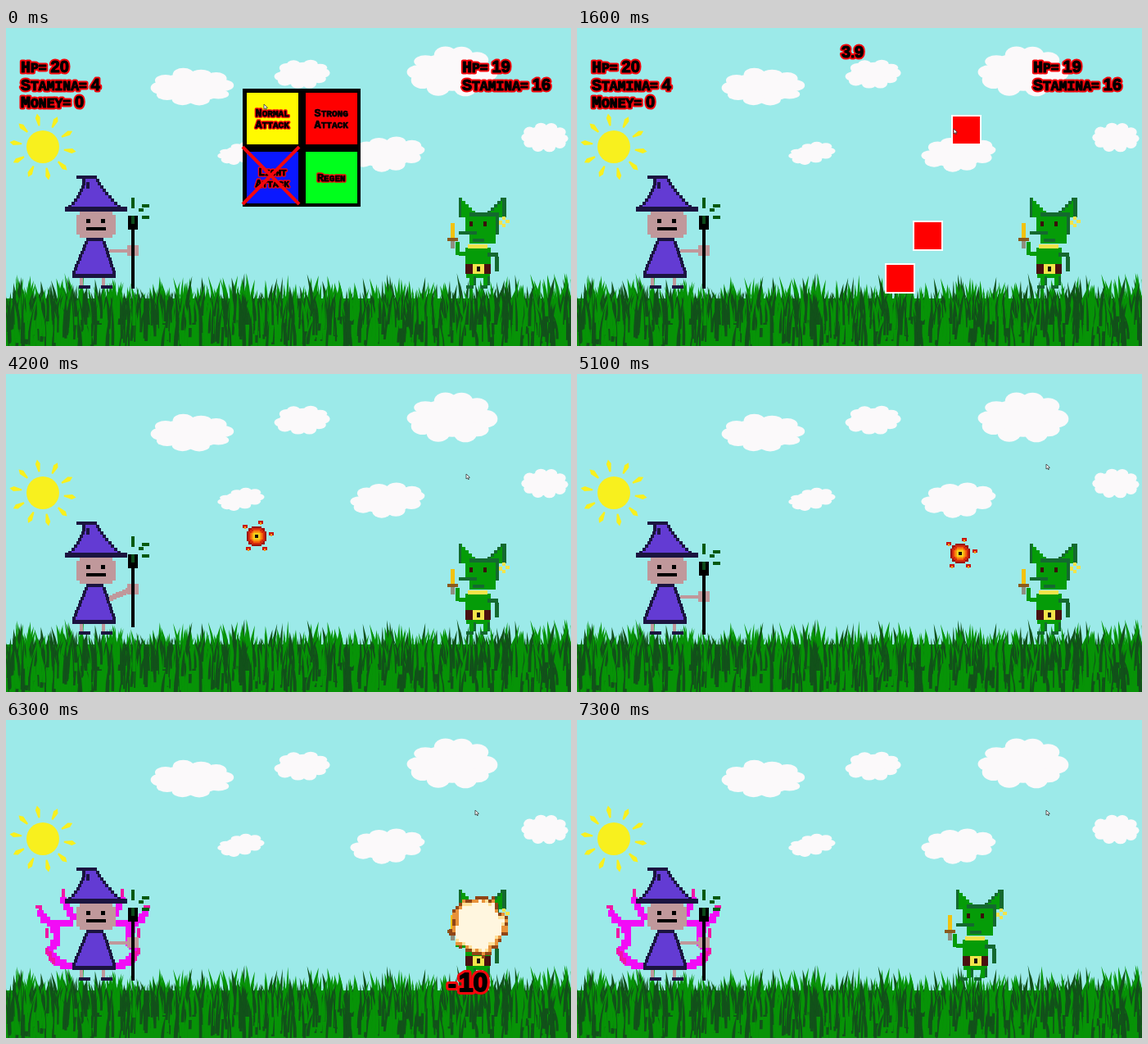
Animation, 690 px wide and 388 px high, one loop 7400 ms. Source, as an HTML page with a canvas:

```html
<!DOCTYPE html>
<html lang="en">
<head>
<meta charset="utf-8">
<title>Turn battle</title>
<style>
html, body { margin: 0; width: 100%; height: 100%; overflow: hidden; background: #9ceae9; }
canvas { display: block; width: 690px; height: 388px; }
</style>
</head>
<body>
<canvas id="stage" width="690" height="388"></canvas>
<script>
const W = 690, H = 388, STEP = 100, STEPS = 74;
const stage = document.getElementById('stage').getContext('2d');
const back = document.createElement('canvas');
back.width = W;
back.height = H;
let g = stage;

let seed = 11;
const rnd = (a = 0, b = 1) => {
  seed = (seed * 16807) % 2147483647;
  return a + (b - a) * seed / 2147483647;
};
const mix = (a, b, k) => a + (b - a) * k;

function rect(color, x, y, w, h) {
  g.fillStyle = color;
  g.fillRect(x, y, w, h);
}

function disc(x, y, rx, ry = rx, turn = 0) {
  g.beginPath();
  g.ellipse(x, y, rx, ry, turn, 0, 7);
  g.fill();
}

// ---- scenery ----
function cloud(l, t, r, b, tilt = 0) {
  const x = (l + r) / 2, y = (t + b) / 2, w = (r - l) / 2, h = (b - t) / 2, lobes = 10;
  g.fillStyle = '#fbf9fa';
  disc(x, y, w * 0.82, h * 0.74, tilt);
  for (let i = 0; i < lobes; i++) {
    const a = (i + rnd(-0.2, 0.2)) * Math.PI * 2 / lobes, size = rnd(0.24, 0.36);
    const px = Math.cos(a) * w * 0.74;
    disc(x + px, y + Math.sin(a) * h * 0.66 + px * tilt, w * 0.25, h * size);
  }
}

function sun() {
  g.fillStyle = '#f8f01e';
  disc(45, 145, 20);
  for (let i = 0; i < 10; i++) {
    g.save();
    g.translate(45, 145);
    g.rotate((-100 + i * 36) * Math.PI / 180);
    g.beginPath();
    g.moveTo(26, -1);
    g.lineTo(36, -3);
    g.lineTo(41, 0);
    g.lineTo(36, 3);
    g.lineTo(26, 1);
    g.fill();
    g.restore();
  }
}

function blade(x, base, tip, lean, w, color) {
  const mid = (base + tip) / 2;
  g.beginPath();
  g.moveTo(x - w / 2, base);
  g.quadraticCurveTo(x - w / 2, mid, x + lean, tip);
  g.quadraticCurveTo(x + w / 2 + 1, mid, x + w / 2, base);
  g.fillStyle = color;
  g.fill();
}

function grass() {
  const light = '#079307', dark = '#12511a';
  rect(light, 0, 330, W, H - 330);
  for (let i = 0; i < 600; i++) {
    const tip = 331 - 32 * rnd() ** 2.2;
    blade(rnd(-5, W + 5), 362, tip, rnd(-9, 9), rnd(4, 8), rnd() < 0.36 ? dark : light);
  }
  for (let i = 0; i < 420; i++) {
    const base = rnd(350, 396);
    blade(rnd(-5, W + 5), base, Math.max(322, base - rnd(28, 60)), rnd(-8, 8), rnd(1.5, 4), dark);
    if (i % 2) blade(rnd(-5, W + 5), base, base - 42, rnd(-8, 8), 4, light);
  }
}

function scenery() {
  g = back.getContext('2d');
  rect('#9ceae9', 0, 0, W, H);
  sun();
  cloud(176, 48, 279, 96);
  cloud(327, 37, 396, 75, -0.06);
  cloud(489, 22, 601, 85);
  cloud(258, 139, 316, 166, -0.16);
  cloud(420, 131, 512, 175, -0.08);
  cloud(629, 114, 687, 153);
  grass();
  g = stage;
}

// ---- lettering: large capitals and digits, the rest as small capitals ----
function label(text, x, y, size, edge = 5) {
  g.lineJoin = 'round';
  for (const color of ['#f4060c', '#000']) {
    let at = x;
    for (const ch of text) {
      const digit = /\d/.test(ch), narrow = ch === ' ' || ch === '.';
      const family = digit ? '"Liberation Sans", sans-serif' : '"Liberation Mono", monospace';
      g.font = `bold ${digit || /[A-Z]/.test(ch) ? size : size * 0.82}px ${family}`;
      const up = ch.toUpperCase(), w = g.measureText(up).width;
      const px = narrow ? at - w / 4 : at;
      g.strokeStyle = g.fillStyle = color;
      g.lineWidth = color === '#000' ? size / 18 : edge;
      g.strokeText(up, px, y);
      g.fillText(up, px, y);
      at += narrow ? w / 2 : w;
    }
  }
}

function hud() {
  ['Hp= 20', 'Stamina= 4', 'Money= 0'].forEach((s, i) => label(s, 18, 54 + i * 21.5, 20));
  ['Hp= 19', 'Stamina= 16'].forEach((s, i) => label(s, 557, 54 + i * 21.5, 20));
}

const buttons = [
  ['#fffa00', 'Normal', 'Attack'], ['#ff0000', 'Strong', 'Attack'],
  ['#0a18ff', 'Light', 'Attack'], ['#00ff1c', 'Regen']
];

function menu() {
  rect('#000', 289, 74, 144, 144);
  buttons.forEach(([color, ...lines], i) => {
    const x = 294 + i % 2 * 72, y = 79 + (i >> 1) * 72;
    rect(color, x, y, 63, 63);
    lines.forEach((s, j) => label(s, x + 31 - s.length * 3.4, y + 43 - lines.length * 7 + j * 13.5, 13.5, 3.4));
  });
  g.strokeStyle = '#f4060c';
  g.lineWidth = 4;
  g.beginPath();
  g.moveTo(289, 145);
  g.lineTo(358, 215);
  g.moveTo(358, 145);
  g.lineTo(289, 215);
  g.stroke();
}

// ---- characters ----
// Rows of a shape with dark sides; left and right follow k from 0 to 1.
function rimmed(top, rows, left, right, rim, fill) {
  for (let i = 0; i < rows; i++) {
    const k = i / (rows - 1), y = top + i * 4;
    const l = Math.round(left(k)), r = Math.round(right(k));
    rect(rim, l, y, r - l, 4);
    rect(fill, l + 4, y, r - l - 8, 4);
  }
}

// Square blocks on a 4 px grid along a line of points.
function trace(color, size, ...points) {
  const snap = v => Math.round(v / 4) * 4;
  for (let i = 1; i < points.length; i++)
    for (let k = 0; k <= 1; k += 0.1) {
      const [x, y] = [0, 1].map(a => snap(mix(points[i - 1][a], points[i][a], k)));
      rect(color, x - size / 2, y - size / 2, size, size);
    }
}

function wings() {
  for (const side of [-1, 1]) {
    g.save();
    g.translate(106, 0);
    g.scale(side, 1);
    trace('#f016a4', 4, [36, 209], [36, 220]);
    trace('#f016a4', 4, [66, 227], [64, 236]);
    trace('#f20cf6', 8, [34, 220], [24, 240]);
    trace('#f20cf6', 8, [64, 236], [52, 248], [28, 246]);
    trace('#f20cf6', 8, [48, 250], [42, 268], [52, 282], [42, 296], [28, 300]);
    trace('#f016a4', 4, [54, 256], [54, 264]);
    trace('#f016a4', 4, [56, 280], [48, 296]);
    g.restore();
  }
}

function wizard(lift) {
  const dark = '#1b1440', robe = '#633bd3', skin = '#c0989b', leaf = '#07590f';
  rect(skin, 86, 228, 48, 24);
  rect(skin, 90, 224, 40, 32);
  rect(dark, 86, 180, 25, 4);
  rimmed(184, 9, k => 93 - 17 * k ** 1.8, k => 114 + 26 * k ** 1.2, dark, robe);
  rect(dark, 98, 188, 4, 8);
  rect(dark, 72, 218, 76, 6);
  for (const x of [98, 116]) rect('#000', x, 233, 5, 5);
  rect('#000', 98, 243, 24, 4);
  rect(dark, 98, 256, 21, 4);
  rimmed(260, 10, k => 96 - 15 * k, k => 122 + 12 * k, dark, robe);
  rect(dark, 81, 300, 53, 5);
  for (const x of [90, 117]) {
    rect(skin, x, 305, 4, 10);
    rect(dark, x - 1, 314, 14, 4);
  }
  for (let i = 0; i < 6; i++) rect(skin, 126 + i * 4, Math.round(270 - lift * i / 5), 5, lift ? 7 : 4);
  g.save();
  g.translate(0, -lift);
  rect(skin, 148, 265, 14, 13);
  rect('#000', 153, 243, 4, 75);
  rect('#000', 149, 229, 12, 17);
  rect('#0b4a18', 153, 229, 4, 10);
  rect(leaf, 153, 207, 4, 13);
  rect(leaf, 162, 220, 6, 4);
  for (const y of [215, 229]) rect(leaf, 166, y, 9, 4);
  g.restore();
}

function goblin(shift, stride) {
  const green = '#059c08', shade = '#14692f', gold = '#f3e44a';
  g.save();
  g.translate(-shift, 0);
  for (let i = 0; i < 6; i++) {
    const y = 207 + i * 4;
    rect(green, 553, y, 4 + i * 4, 4);
    rect(green, 606 - i * 4, y, i * 4, 4);
    rect(shade, 553, y, 3, 4);
    rect(shade, 606, y, 5, 4);
    rect(shade, 604 - i * 4, y, 4, 4);
  }
  rect(green, 561, 229, 41, 23);
  rect(green, 566, 252, 32, 11);
  rect(shade, 566, 225, 36, 5);
  rect(shade, 598, 229, 4, 23);
  rect(shade, 553, 248, 22, 4);
  rect(shade, 570, 257, 14, 4);
  for (const x of [566, 583]) rect('#3a0d0b', x, 236, 4, 6);
  rect(gold, 602, 235, 4, 5);
  for (const y of [230, 239]) rect(gold, 606, y, 4, 4);
  rect(gold, 610, 234, 5, 4);
  rect(green, 561, 268, 31, 20);
  rect(green, 549, 261, 5, 16);
  rect(green, 553, 273, 9, 5);
  rect(gold, 564, 264, 24, 5);
  rect(shade, 588, 274, 13, 5);
  rect(shade, 597, 279, 5, 18);
  rect('#4a0f10', 561, 288, 31, 12);
  rect(gold, 570, 288, 14, 12);
  rect('#111', 575, 291, 4, 6);
  rect(green, 562, 300, 29, 5);
  for (const x of [566, 583]) {
    rect(green, x, 305, 5, 10);
    rect(shade, x + 5, 303, 3, 11);
    rect(shade, x - 4 - stride * 4, 314, 9, 4);
  }
  rect('#f2c20f', 543, 238, 5, 18);
  rect('#8a5a1e', 539, 256, 13, 4);
  rect('#8f8f80', 543, 260, 5, 9);
  g.restore();
}

// ---- effects ----
// A blocky blob; shade(x, y) gives a colour or nothing.
function blocks(cx, cy, half, cell, shade) {
  for (let y = -half; y < half; y += cell)
    for (let x = -half; x < half; x += cell) {
      const color = shade(x + cell / 2, y + cell / 2);
      if (color) rect(color, cx + x, cy + y, cell, cell);
    }
}

function fireball(x, y) {
  const rings = ['#161008', '#f8d21a', '#f99a12', '#f4600e', '#d42a0c', '#9c100c'];
  blocks(x, y, 14, 2, (dx, dy) => rings[Math.floor(Math.hypot(dx, dy) / 2.15)]);
  for (let i = 0; i < 5; i++) {
    const a = (-140 + 66 * i) * Math.PI / 180;
    const fx = Math.round(x + 18 * Math.cos(a)), fy = Math.round(y + 18 * Math.sin(a));
    rect('#c8160e', fx - 3, fy - 2, 6, 4);
    rect('#f79a14', fx - 1, fy, 2, 3);
  }
}

function blast(size) {
  blocks(577, 251, 56, 4, (x, y) => {
    const a = Math.atan2(y, x);
    const spike = 0.16 * Math.exp(-(((a + 0.22) / 0.15) ** 2));
    const edge = 0.97 + 0.05 * Math.sin(5 * a + 1) + 0.04 * Math.sin(11 * a) + spike;
    const d = Math.hypot(x / 45, y / 48) / edge / size + 0.05 * Math.sin(x * 7 + y * 3);
    if (d > 1.03) return null;
    return d < 0.83 ? '#fff6df' : d < 0.88 ? '#ffdf98' : d < 0.95 ? '#e8923a' : '#8f4516';
  });
}

function targets(n) {
  [[458, 107], [377, 288], [411, 236]].forEach(([x, y], i) => {
    if (n >= 18 + i * 6) return;
    rect('#fff', x - 1, y - 1, 37, 37);
    rect('#ff0000', x + 1, y + 1, 33, 33);
  });
}

// Pointer stops: step, x, y.
const trail = [
  [0, 315, 93], [16, 460, 123], [23, 392, 304], [29, 421, 262],
  [32, 421, 262], [38, 559, 79], [42, 562, 122], [47, 573, 110], [STEPS, 573, 110]
];

function pointer(n) {
  const i = trail.findIndex(p => p[0] > n);
  const [t0, x0, y0] = trail[i - 1], [t1, x1, y1] = trail[i];
  const k = (n - t0) / (t1 - t0);
  g.save();
  g.translate(mix(x0, x1, k), mix(y0, y1, k));
  g.beginPath();
  g.moveTo(0, 0);
  g.lineTo(0, 6);
  g.lineTo(1.6, 4.8);
  g.lineTo(3, 7);
  g.lineTo(2.8, 4.4);
  g.lineTo(4.4, 4.2);
  g.closePath();
  g.fillStyle = '#fff';
  g.fill();
  g.strokeStyle = '#333';
  g.lineWidth = 0.8;
  g.stroke();
  g.restore();
}

// ---- timeline, in steps of 100 ms ----
function draw(n) {
  g.drawImage(back, 0, 0);
  if (n >= 57) wings();
  wizard(n < 33 ? 0 : Math.min(14 * (n - 32), 28, Math.max(0, 9 + 5 * (42 - n))));

  const walk = n < 68 ? 0 : n - 67 - (n > 71);
  goblin(18 * walk, walk % 2);

  if (n < 32) hud();
  if (n < 5) menu();
  else if (n < 32) {
    label((5.5 - n / 10).toFixed(1), 323, 36, 20);
    targets(n);
  }
  if (n >= 34 && n < 57) {
    const k = n - 42 - (n > 52);
    fireball(306 + 18 * k, Math.round(198 + 2.3 * k));
  }
  const size = Math.min(1, (n - 55) / 4, (66 - n) / 4);
  if (size > 0) blast(size);
  if (n >= 57 && n < 65) label('-10', 537, 287 + 11 * (n - 59), 32, 8);
  pointer(n);
}

scenery();
let shown = -1;
const start = performance.now();
function tick() {
  const n = Math.floor((performance.now() - start) / STEP) % STEPS;
  if (n !== shown) draw(shown = n);
  requestAnimationFrame(tick);
}
tick();
</script>
</body>
</html>
```
